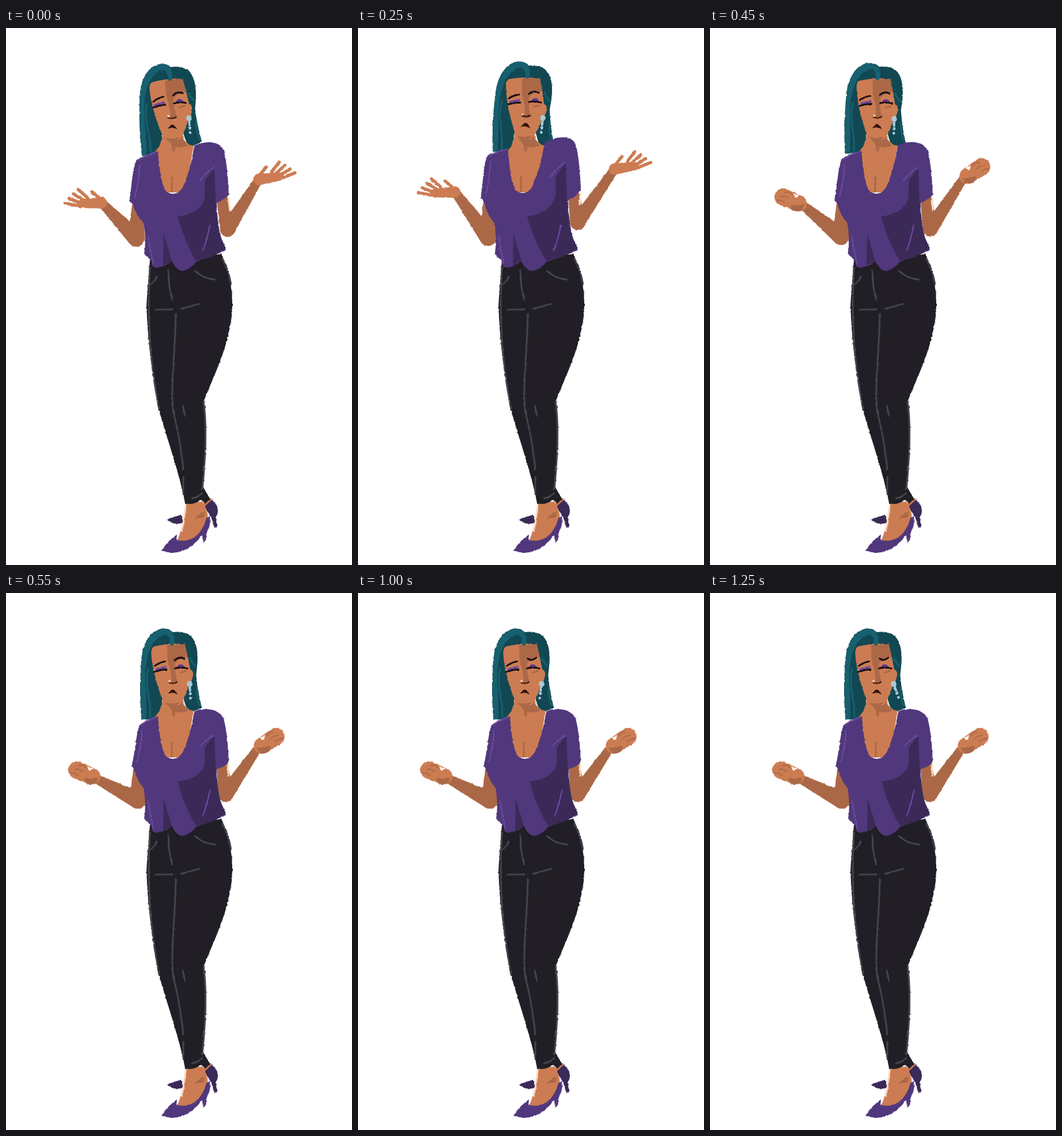
These frames come from a looping animation (601x931 px, 2250 ms). An HTML page:

```html
<!DOCTYPE html>
<html lang="en">
<head>
<meta charset="utf-8">
<title>Shrug</title>
<style>
html, body { margin: 0; width: 100%; height: 100%; overflow: hidden; background: #fff; }
svg { display: block; width: 100%; height: 100%; }
path { stroke-linecap: round; stroke-linejoin: round; }
.line { fill: none; stroke-width: 3; }
.skin { fill: #cc7c52; } .shade { fill: #ab6847; } .white { fill: #fff; }
.purple { fill: #51377c; } .plum { fill: #3b2a57; } .lid { fill: #5b3b8c; }
.hair { fill: #124853; } .teal { fill: #17606f; } .denim { fill: #211e25; }
.lips { fill: #32100f; } .silver { fill: #a9cbd8; }
.skin.line { fill: none; stroke: #cc7c52; }
.shade.line { fill: none; stroke: #ab6847; }
.teal.line { fill: none; stroke: #17606f; }
.silver.line { fill: none; stroke: #a9cbd8; stroke-width: 4; }
.lid.line { fill: none; stroke: #6a459c; stroke-width: 4; }
.glow.line { stroke: #fbdcc3; }
.seam.line { stroke: #45434d; }
.lilac.line { stroke: #684a98; stroke-width: 2.4; }
.ink.line { stroke: #160d12; }
.finger.line { stroke: #cc7c52; stroke-width: 5.5; }
</style>
</head>
<body>
<svg viewBox="0 0 601 931">
  <filter id="rough" filterUnits="userSpaceOnUse" x="0" y="0" width="601" height="931" color-interpolation-filters="sRGB">
    <feTurbulence type="fractalNoise" baseFrequency=".22" numOctaves="2" seed="4"/>
    <feDisplacementMap in="SourceGraphic" scale="2.8" xChannelSelector="R" yChannelSelector="G"/>
  </filter>
  <g filter="url(#rough)">
    <g id="shoes">
      <path class="plum" d="M279,852 Q293,847 304,844 L308,857 Q293,864 279,852Z"/>
      <path class="skin" d="M343,824 L356,815 L357,828 L346,836Z"/>
      <path class="plum" d="M345,830 L358,817 Q371,830 367,843 L364,849 L367,865 L362,867 L357,850Z"/>
      <path class="skin" d="M313,823 L341,821 Q354,840 349,855 Q341,876 325,889 L297,890 Q306,870 313,823Z"/>
      <path class="glow line" d="M312,827 Q310,852 305,872"/>
      <path class="shade" d="M327,851 Q336,840 346,838 L344,848Z"/>
      <path class="purple" d="M270,906 Q280,890 297,878 L296,887 C325,896 344,870 348,849 L354,846 Q357,860 349,874 L347,890 L342,891 L341,879 C325,900 307,910 287,910Z"/>
    </g>

    <g id="trousers">
      <path class="denim" d="M250,402 L374,392 C388,420 396,460 392,500 C384,560 362,600 344,646 C350,690 348,740 342,795 L355,817 L346,825 L339,818 Q325,828 311,824 C302,775 284,725 266,664 C252,590 246,540 244,480 C246,450 248,425 250,402Z"/>
      <path class="seam line" d="M250,415 Q242,540 266,662 M376,400 Q387,420 391,445 M295,496 C293,580 284,640 292,672 Q302,710 308,765 M343,646 Q351,700 341,800 M308,778 V808 M323,815 Q334,814 341,806"/>
      <path class="seam line" d="M282,420 Q282,450 289,471 M259,488 H289 M304,487 L336,478 M262,431 Q258,440 250,445 M328,421 Q343,435 363,436 M307,655 L311,672"/>
    </g>

    <g id="arms"></g>

    <g class="head">
      <path class="hair" d="M239,110 C244,75 262,57 280,57 Q292,57 297,64 Q320,62 330,76 C340,92 338,115 333,140 Q334,170 340,198 L316,206 L300,150 L272,180 L266,213 H234 C233,180 234,150 239,110Z"/>
    </g>
    <g id="neck">
      <path class="skin" d="M272,180 Q272,200 259,214 L266,285 H312 L326,204 Q308,202 306,178Z"/>
      <path class="shade" d="M278,190 L305,185 Q308,198 317,204 Q305,209 294,206 L293,214 H289 L288,203Z"/>
    </g>
    <g class="head">
      <path class="skin" d="M316,132 Q327,126 328,138 Q326,152 319,157Z"/>
      <path class="skin" d="M257,96 Q259,87 264,87 Q290,82 316,87 Q321,110 323,130 C322,160 309,190 296,193 Q284,196 274,185 C264,155 257,125 257,96Z"/>
      <path class="shade" d="M285,86 H316 L320,108 Q297,113 297,121 V134 L300,151 H290 Q290,130 285,115Z M275,184 Q288,191 301,185 L297,193 L285,194Z"/>
      <path class="shade line" d="M306,135 L315,133"/>
      <path class="lid line" d="M265,127 L280,124"/>
      <path class="lid" d="M300,126 Q306,114 315,126Z"/>
      <path class="ink line" d="M261,131 Q271,128 282,128 M297,127 Q308,125 318,128 M262,121 Q268,116 280,114"/>
      <path class="ink line" id="brow"/>
      <path class="ink line" style="stroke:#45201a;stroke-width:2.5" d="M285,151 Q292,154 299,151"/>
      <path class="glow line" d="M286,148 v1"/>
      <path class="lips" d="M282,170 L290,163 L295,165 L299,172 L290,169Z"/>
      <path class="teal" d="M296,87 C305,70 292,57 280,57 C255,58 241,90 239,115 C235,150 234,190 234,213 H242 C246,185 242,165 245,135 C247,100 262,68 285,67 Q292,74 291,87Z"/>
      <path class="teal line" d="M250,125 C241,160 254,180 249,212 M324,111 Q326,119 333,125 M333,160 Q331,180 337,194"/>
      <circle class="silver" cx="321" cy="155" r="5"/>
      <g id="beads">
        <path class="silver line" d="M321,160 v7"/>
        <circle class="silver" cx="321" cy="172" r="2.7"/>
        <circle class="silver" cx="321" cy="180" r="2.4"/>
      </g>
    </g>

    <g id="shirt">
      <path class="purple" d="M264,214 Q235,222 226,230 C218,250 219,275 214,300 L220,305 Q226,325 239,338 Q244,365 240,392 L252,403 L255,414 Q272,418 288,404 Q297,422 308,421 Q320,418 331,405 Q355,398 382,385 Q368,360 366,303 Q380,298 387,289 C386,255 382,225 378,212 C372,196 348,194 327,204 Q320,250 306,278 C298,290 287,290 277,282 C270,272 266,240 264,214Z"/>
      <path class="plum" d="M298,327 Q338,322 345,295 L346,264 L362,242 Q364,330 371,358 L382,382 L357,397 L330,404 Q310,370 298,327Z M274,356 L288,404 L273,412Z"/>
      <path class="lilac line" d="M232,238 Q231,265 224,293 M361,242 Q348,250 337,264 M354,342 Q350,365 342,386 M247,360 Q250,385 256,408 M230,230 Q242,221 262,215"/>
      <path class="shade line" d="M288,259 L288,284"/>
    </g>
  </g>
</svg>
<script>
const LOOP = 2250, STEP = 50;
const $ = id => document.getElementById(id);
const clamp = v => Math.max(0, Math.min(1, v));
const ramp = (t, from, to) => clamp((t - from) / (to - from));

function add(parent, tag, attrs = {}) {
  const node = document.createElementNS('http://www.w3.org/2000/svg', tag);
  for (const name in attrs) node.setAttribute(name, attrs[name]);
  return parent.appendChild(node);
}

function poseAt(t) {
  const rise = ramp(t, 0, 150), grip = ramp(t, 350, 550);
  return {
    grip,
    lift: rise * (1 - ramp(t, 150, 550)) ** 1.3,
    tilt: -5 * (1 - rise) - 3 * grip,
    frown: ramp(t, 750, 850),
    swing: 6 * Math.sin(Math.PI * ramp(t, 0, 550)) + 16 * Math.sin(1.5 * Math.PI * ramp(t, 750, 1250))
  };
}

// Moves a point of the resting shirt with the shoulders.
function warp(x, y, { lift, grip }) {
  const side = Math.abs(x - 290) / 95;
  const upper = clamp((335 - y) / 70);
  return [
    x - 7 * lift * (1 - side) + 8 * grip * clamp((250 - x) / 36) * upper,
    y - lift * (2 + 15 * side) * upper + 6 * grip * clamp((x - 320) / 50) * upper
  ];
}

// Outline of a limb that narrows from radius ra at a to rb at b.
function taper(a, b, ra, rb) {
  const angle = Math.atan2(b[1] - a[1], b[0] - a[0]) + Math.PI / 2;
  const at = (p, r) => [p[0] + r * Math.cos(angle), p[1] + r * Math.sin(angle)];
  return `M${at(a, ra)}L${at(b, rb)}A${rb},${rb} 0 0 0 ${at(b, -rb)}L${at(a, -ra)}A${ra},${ra} 0 0 0 ${at(a, ra)}Z`;
}

// Hands are drawn pointing left, with the wrist at the origin.
function openHand(parent) {
  const hand = add(parent, 'g');
  add(hand, 'path', { class: 'skin', d: taper([-3, -3], [-39, -1], 10, 7) });
  for (let i = 0; i < 4; i++) {
    const angle = (191 + 10 * i) * Math.PI / 180;
    const [x, y] = [-45 + 6 * i, 2 - 4.5 * i];
    add(hand, 'path', { class: 'finger line', d: `M-30,-3L${x},${y}l${22 * Math.cos(angle)},${22 * Math.sin(angle)}` });
  }
  add(hand, 'path', { class: 'finger line', d: 'M-4,-9L-20,-22' });
  return hand;
}

function fist(parent) {
  const hand = add(parent, 'g');
  add(hand, 'path', { class: 'skin', d: taper([-12, -7], [-39, -18], 14, 15) });
  add(hand, 'path', { class: 'shade', d: 'M-26,-4Q-10,-2 -2,-6L-6,5Q-18,9 -24,4Z' });
  for (let i = 0; i < 3; i++)
    add(hand, 'path', { class: 'shade line', style: 'stroke-width:2', d: `M${-50 + 7 * i},${-12 - 7 * i}q8,-2 13,3` });
  add(hand, 'path', { class: 'white', d: 'M-21,-25L-16,-22L-11,-22L-14,-17L-18,-17Z' });
  return hand;
}

function arm(place, turn, radii) {
  const parent = $('arms');
  const upper = add(parent, 'path', { class: 'shade' });
  const lower = add(parent, 'path', { class: 'shade' });
  const hand = add(parent, 'g');
  const open = openHand(hand), closed = fist(hand);
  return pose => {
    const { shoulder, elbow, wrist } = place(pose);
    upper.setAttribute('d', taper(shoulder, elbow, 10, radii[0]));
    lower.setAttribute('d', taper(elbow, wrist, radii[0], radii[1]));
    hand.setAttribute('transform', `translate(${wrist}) ${turn}`);
    open.setAttribute('visibility', pose.grip < .5 ? 'visible' : 'hidden');
    closed.setAttribute('visibility', pose.grip < .5 ? 'hidden' : 'visible');
    return { shoulder, elbow };
  };
}

const leftArm = arm(pose => ({
  shoulder: warp(229, 308, pose),
  elbow: [226 + 3 * pose.grip, 364 - 5 * pose.grip - 2 * pose.lift],
  wrist: [169 + 3 * pose.lift - 7 * pose.grip, 306 - 27 * pose.lift + 19 * pose.grip]
}), '', [15, 8]);

const rightArm = arm(pose => ({
  shoulder: warp(376, 298, pose),
  elbow: [385 - 5 * pose.lift - 3 * pose.grip, 349 - 25 * pose.lift ** 2],
  wrist: [437 + 9 * pose.lift - 3 * pose.grip, 266 - 26 * pose.lift + 8 * pose.grip]
}), 'rotate(-11) scale(-1 1)', [13, 7.5]);

const armGlow = add($('arms'), 'path', { class: 'glow line' });
const cloth = [...document.querySelectorAll('#shirt path')].map(path => ({ path, rest: path.getAttribute('d') }));

function render(t) {
  const pose = poseAt(t);
  leftArm(pose);
  const { shoulder, elbow } = rightArm(pose);
  armGlow.setAttribute('d', `M${shoulder[0] + 10},${shoulder[1] - 6}L${elbow[0] + 4},${elbow[1] - 32}`);
  for (const { path, rest } of cloth)
    path.setAttribute('d', rest.replace(/([\d.]+),([\d.]+)/g, (_, x, y) => warp(+x, +y, pose)));
  for (const part of document.querySelectorAll('.head'))
    part.setAttribute('transform', `translate(0 ${4 * (1 - pose.lift)}) rotate(${pose.tilt} 290 190)`);
  $('beads').setAttribute('transform', `rotate(${pose.swing} 321 155)`);
  const f = pose.frown;
  $('brow').setAttribute('d', `M${297 + 2 * f},${113 - 3 * f}Q305,${106 + 10 * f} 314,${111 - 2 * f}`);
}

let shown = -1;
function frame() {
  const t = Math.floor((performance.now() % LOOP) / STEP) * STEP;
  if (t !== shown) render(shown = t);
  requestAnimationFrame(frame);
}
frame();
</script>
</body>
</html>
```
